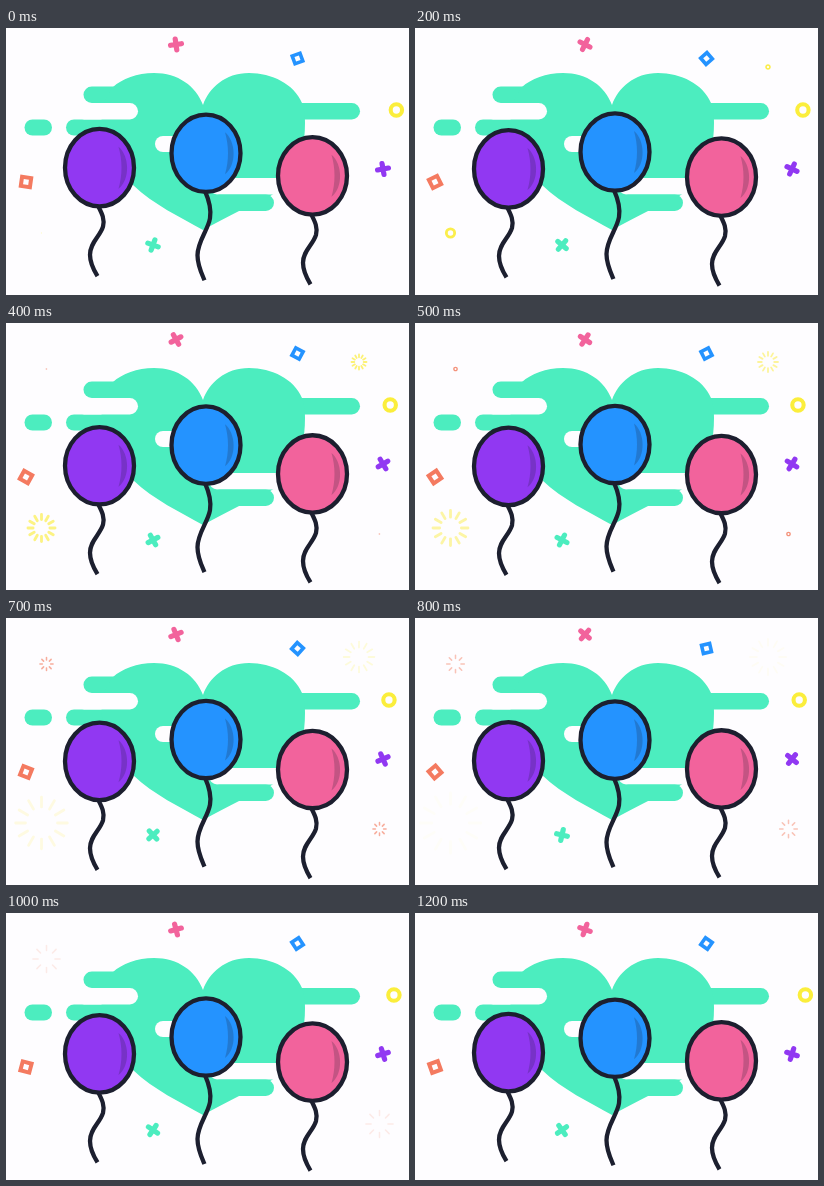
Write an HTML page that moves like this. It is 403 px wide and 267 px high and loops after 1.3 s.

```html
<!DOCTYPE html>
<html lang="en">
<head>
<meta charset="utf-8">
<title>Balloons</title>
<style>
  html, body { margin: 0; width: 100%; height: 100%; overflow: hidden; background: #fefdff; }
  svg { display: block; width: 100vw; height: 100vh; }
  .mint { fill: #4cedbf; }
  .gap { fill: #fefdff; }
  .line { fill: none; stroke: #1c1f2f; stroke-width: 4.3; }
  .confetti { fill: none; stroke-width: 5.2; stroke-linecap: round; }
  .box { stroke-width: 4; stroke-linecap: butt; }
  .burst { fill: none; stroke-linecap: round; }
</style>
</head>
<body>
<svg viewBox="0 0 403 267">
  <defs>
    <path id="short" class="line" d="M-1.500 38C2 45 5.500 51 3.500 59C.5 69-9.500 75-9.500 87C-9.500 95-6 102-2 108.500"/>
    <path id="long" class="line" d="M-1 38C3 47 5.500 56 4 65C2 77-8.500 88-8.500 102C-8.500 112-5 119-1.500 127"/>
    <g id="balloon">
      <ellipse rx="34.500" ry="38.700"/>
      <path d="M19-21C30-12 31 12 19 21C23 7 23-7 19-21Z" fill="#1c1f2f" fill-opacity=".22"/>
      <ellipse class="line" rx="34.500" ry="38.700"/>
    </g>
    <path id="cross" d="M-5.500 0H5.500M0-5.500V5.500"/>
    <rect id="square" x="-4.600" y="-4.600" width="9.200" height="9.200"/>
  </defs>

  <g class="mint">
    <rect x="18.500" y="91.500" width="27.500" height="16" rx="8"/>
    <rect x="77.500" y="58.500" width="70" height="16.500" rx="8.250"/>
    <rect x="60" y="91.500" width="80" height="16" rx="8"/>
    <rect x="270" y="75" width="84" height="16.500" rx="8.250"/>
    <path d="M197 77C190 58 172 45 148 45C131 45 116 51 107 59C98 70 94 84 96 99C100 123 112 143 127 157C148 177 174 189 197 202C209 195 222 189 235 182C258 173 274 164 284 150C295 135 299 116 299 95C299 87 298.500 81 296 75C288 56 266 45 243 45C219 45 203 60 197 77Z"/>
  </g>
  <g class="gap">
    <rect x="70" y="75" width="62" height="16.500" rx="8.250"/>
    <rect x="149" y="108" width="60" height="16" rx="8"/>
    <rect x="203" y="150" width="110" height="16.500" rx="8.250"/>
  </g>
  <rect class="mint" x="205" y="166.500" width="63" height="16.500" rx="8.250"/>

  <g id="bursts"></g>
  <g id="confetti"></g>
  <g id="balloons"></g>
</svg>
<script>
  const LOOP = 1300, STEP = 100;
  const $ = id => document.getElementById(id);

  function add(parent, tag, attrs) {
    const el = document.createElementNS('http://www.w3.org/2000/svg', tag);
    for (const k in attrs) el.setAttribute(k, attrs[k]);
    return parent.appendChild(el);
  }

  // x, resting y, drift, colour, string
  const balloons = [
    [93.5, 139.6, 4, '#9138f2', 'short'],
    [200, 125.3, -4, '#2493ff', 'long'],
    [306.5, 147.8, 4, '#f2639c', 'short']
  ].map(([x, y, drift, fill, string]) => {
    const el = add($('balloons'), 'g', { fill });
    add(el, 'use', { href: '#' + string });
    add(el, 'use', { href: '#balloon' });
    return { x, y, drift, el };
  });

  // shape, x, y, colour, start angle, degrees per loop, scale
  const spinners = [
    ['cross', 170, 16.5, '#f2639c', -8, -360, 1],
    ['cross', 377, 141, '#9138f2', -10, -360, 1],
    ['cross', 147, 217, '#4cedbf', 20, -450, 1],
    ['square', 291.5, 30.5, '#2493ff', -20, 450, 0.9],
    ['square', 20, 154, '#f47a60', 8, 360, 1]
  ].map(([shape, x, y, stroke, angle, turn, scale]) => ({
    x, y, angle, turn, scale,
    el: add($('confetti'), 'use', {
      href: '#' + shape, stroke, class: shape === 'square' ? 'confetti box' : 'confetti'
    })
  }));

  const ring = add($('confetti'), 'circle',
    { cy: 82, r: 5.7, fill: 'none', stroke: '#fbee3c', 'stroke-width': 4.1 });

  // x, y, colour, start time, life, final radius, rays
  const bursts = [
    [35.5, 205, '#fbee4c', -20, 860, 35.5, 12],
    [353, 39, '#fbee4c', 30, 830, 22, 12],
    [40.5, 46, '#f4937c', 340, 800, 19, 8],
    [373.5, 211, '#f4937c', 340, 800, 19, 8]
  ].map(([x, y, stroke, start, life, size, rays]) => ({
    start, life, size, rays,
    el: add($('bursts'), 'path', { class: 'burst', stroke, transform: `translate(${x} ${y})` })
  }));

  function burstPath(inner, outer, rays) {
    let d = '';
    for (let i = 0; i < rays; i++) {
      const a = i * 2 * Math.PI / rays, c = Math.cos(a), s = Math.sin(a);
      d += `M${c * inner} ${s * inner}L${c * outer} ${s * outer}`;
    }
    return d;
  }

  function drawBurst(b, t) {
    const p = (t - b.start) / b.life;
    const on = p > 0 && p < 1;
    b.el.setAttribute('opacity', on ? Math.min(1, 1.6 * (1 - p) ** 1.25) : 0);
    if (!on) return;
    const outer = b.size * p ** 1.2;
    if (p < 0.32) {
      // a small ring before it breaks into rays
      const r = outer * 0.6;
      b.el.setAttribute('d', `M${-r} 0A${r} ${r} 0 1 1 ${r} 0A${r} ${r} 0 1 1 ${-r} 0`);
    } else {
      b.el.setAttribute('d', burstPath(outer * 0.56, outer * 0.9, b.rays));
    }
    b.el.setAttribute('stroke-width', Math.min(b.size * 0.08, outer * 0.5));
  }

  function draw(t) {
    const sway = (1 - Math.cos(2 * Math.PI * (t + 50) / LOOP)) / 2;
    for (const b of balloons)
      b.el.setAttribute('transform', `translate(${b.x} ${b.y + b.drift * sway})`);
    for (const s of spinners)
      s.el.setAttribute('transform',
        `translate(${s.x} ${s.y}) rotate(${s.angle + s.turn * t / LOOP}) scale(${s.scale})`);
    ring.setAttribute('cx', 390.5 - 8 * sway);
    for (const b of bursts) drawBurst(b, t);
  }

  const begin = performance.now();
  function tick() {
    const t = (performance.now() - begin) % LOOP;
    draw(Math.floor(t / STEP) * STEP);
    requestAnimationFrame(tick);
  }
  tick();
</script>
</body>
</html>
```
